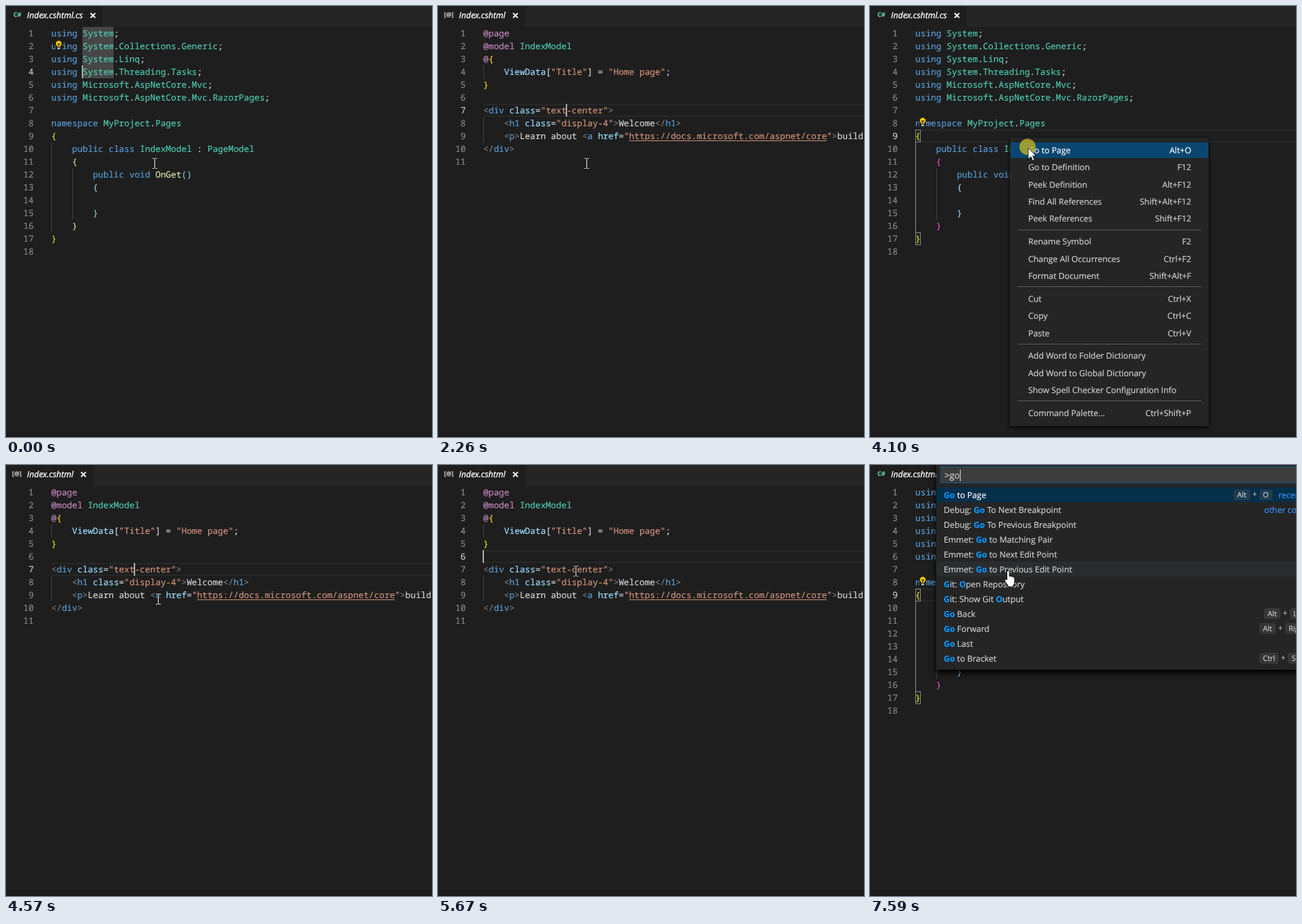
These frames come from a looping animation (630 by 638 pixels, 8 s). An HTML page:

```html
<!DOCTYPE html>
<html lang="en">
<head>
<meta charset="utf-8">
<title>Editor: switching between page and model</title>
<style>
html, body { margin: 0; width: 100%; height: 100%; overflow: hidden; background: #1e1e1e; }
#stage { position: relative; width: 630px; height: 638px; overflow: hidden; background: #1e1e1e;
  font: 12.35px "Open Sans", sans-serif; color: #d0d0d0; text-rendering: geometricPrecision; white-space: pre;
  -webkit-text-stroke: .2px; }
#stage div { position: absolute; box-sizing: border-box; }
#stage svg { position: absolute; left: 0; top: 0; overflow: visible; }
.timed:not(.on) { visibility: hidden; }
.full { inset: 0; }
.bar { left: 0; top: 0; width: 630px; height: 31px; background: #252526; }
.tab { left: 0; top: 0; height: 31px; background: #1e1e1e; color: #fff; line-height: 28px; }
.name { left: 31px; font-style: italic; font-size: 12.4px; -webkit-text-stroke: .35px; }
.icon { top: -1px; font-size: 9px; font-weight: 700; }
.code, .num, .now { font: 12.83px/19px "Noto Sans Mono", monospace; height: 19px; }
.code { left: 67px; }
.num, .now { left: 0; width: 41px; text-align: right; color: #858585; }
.now { color: #c6c6c6; background: #1e1e1e; }
.line { left: 67px; width: 570px; height: 19px; border: 2px solid #282828; border-left: 0; }
.guide { width: 1px; background: #404040; }
.lit { background: #8f8f78; }
.word { left: 113px; width: 46px; height: 19px; background: #474747; }
.caret { width: 2px; height: 19px; background: #aeafad; }
.pair { left: 67px; width: 8px; height: 19px; border: 1px solid #888; background: #0064001a; }
.foot { left: 0; top: 636px; width: 630px; height: 2px; background: #191919; }
.k { color: #569cd6; } .t { color: #4ec9b0; } .w { color: #d4d4d4; } .f { color: #dcdcaa; }
.s, .u { color: #ce9178; } .a { color: #9cdcfe; } .g { color: #808080; } .p { color: #c586c0; }
.u { text-decoration: underline 1px; text-underline-offset: 2px; }
.b0, .r { color: #f5d916; } .b1 { color: #da4fc4; } .b2 { color: #87cefa; }
.soft .b0 { color: #e0cf55; } .soft .b1 { color: #d9cf98; } .soft .b2 { color: #7cc6cc; }
.raw [class^=b] { color: #d4d4d4; } .raw .r { color: #c586c0; } .raw .u { text-decoration: none; }
.menu { background: #252526; box-shadow: 0 2px 5px #000; }
.item { left: 1px; right: 1px; height: 23px; line-height: 23px; padding-left: 26px; }
.item div { right: 25px; top: 0; }
.item.hot { background: #094771; color: #fff; }
.sep { left: 11px; right: 11px; height: 1px; background: #5a5a5a; }
.palette { left: 98px; top: -10px; width: 540px; height: 313px; background: #252526; box-shadow: 0 5px 8px #000; }
.input { left: 104px; top: 2px; width: 540px; height: 25px; background: #3c3c3c; border: 1px solid #0e5c92;
  padding-left: 5px; font-size: 13.2px; line-height: 23px; }
.type { display: inline-block; height: 17px; line-height: 17px; vertical-align: middle; border-right: 1px solid transparent; }
.type.on { border-color: #ddd; }
.row { left: 98px; width: 540px; height: 22px; line-height: 23px; padding-left: 11px; }
.row b { color: #0097fb; }
.row.sel { background: #062f4a; color: #fff; }
.row.over { background: #2a2d2e; }
.keys { top: 3px; display: flex; height: 16px; line-height: 15px; font-size: 11px; gap: 4px; color: #ccc; }
.keys kbd { font: inherit; padding: 0 4px; border: 1px solid #3a3a3a; border-radius: 3px; background: #80808030; }
.tag { top: 0; color: #3794ff; }
</style>
</head>
<body>
<div id="stage"></div>
<script>
const LOOP = 8000, LINE = 19, TOP = 31;
const stage = document.getElementById('stage');
const timed = [];
const lineTop = n => TOP + LINE * (n - 1);

function add(parent, cls, html = '', pos = {}) {
  const el = document.createElement('div');
  el.className = cls;
  el.innerHTML = html;
  for (const k in pos) el.style[k] = pos[k] + 'px';
  parent.append(el);
  return el;
}
// ranges: start, end, start, end, ...
const when = (el, cls, ranges) => (timed.push({ el, cls, ranges }), el);
const show = (el, ...ranges) => (el.classList.add('timed'), when(el, 'on', ranges));
const within = (t, r) => r.some((a, i) => i % 2 === 0 && t >= a && t < r[i + 1]);

const esc = s => s.replace(/&/g, '&amp;').replace(/</g, '&lt;');
const span = (cls, s) => `<span class="${cls}">${esc(s)}</span>`;
const marked = s => s.split('~').map(p => span(p[0], p.slice(2))).join('');

let depth = 0;
function csharp(s) {
  return s.replace(/\w+|[{}()]|[^\w{}()]+/g, w => {
    if (/^(using|namespace|public|class|void)$/.test(w)) return span('k', w);
    if (w === 'OnGet') return span('f', w);
    if (/^\w/.test(w)) return span('t', w);
    if (/[{(]/.test(w)) return span('b' + depth++, w);
    if (/[})]/.test(w)) return span('b' + --depth, w);
    return span('w', w);
  });
}

function editor(title, width, icon, lines, paint) {
  const view = add(stage, 'full');
  add(view, 'bar');
  const tab = add(view, 'tab', icon, { width });
  add(tab, 'name', title);
  tab.insertAdjacentHTML('beforeend',
    `<svg><path d="M${width - 18} 10.5l7 7m0-7l-7 7" stroke="#fff" stroke-width="1.8"/></svg>`);
  const back = add(view, 'full');
  lines.forEach((s, i) => {
    add(view, 'num', i + 1, { top: lineTop(i + 1) });
    add(view, 'code', paint(s), { top: lineTop(i + 1) });
  });
  return { view, back };
}
const guide = (ed, x, from, to, cls = '') =>
  add(ed.back, 'guide ' + cls, '', { left: x, top: lineTop(from), height: LINE * (to - from + 1) });
const caret = (ed, x, n, ...r) => show(add(ed.view, 'caret', '', { left: x - 1, top: lineTop(n) }), ...r);
const activeNum = (ed, n, ...r) => show(add(ed.view, 'now', n, { top: lineTop(n) }), ...r);
const activeLine = (ed, n, ...r) => {
  show(add(ed.back, 'line', '', { top: lineTop(n) }), ...r);
  activeNum(ed, n, ...r);
};
const bulb = (n, ...r) => show(add(cs.view, 'bulb', `<svg><g transform="translate(78 ${lineTop(n) + 7})">
  <path d="M-5-6h10v14h-10z" fill="#1e1e1e"/>
  <path d="M-2 3.6C-2 2-4.2 1.4-4.2-1.4a4.2 4.2 0 0 1 8.4 0C4.2 1.4 2 2 2 3.6z" fill="#fc0"/>
  <path d="M-1.8-1.5L0 .2 1.8-1.5M0 .2V3.5" fill="none" stroke="#1e1e1e" stroke-width="1.2"/>
  <path d="M-2 4.5h4v2.5h-4z" fill="#b5b5b5"/></g></svg>`), ...r);

const cs = editor('Index.cshtml.cs', 143,
  '<div class="icon" style="left:11px;color:#6cc79c">C#</div>',
  ['using System;', 'using System.Collections.Generic;', 'using System.Linq;',
    'using System.Threading.Tasks;', 'using Microsoft.AspNetCore.Mvc;',
    'using Microsoft.AspNetCore.Mvc.RazorPages;', '', 'namespace MyProject.Pages', '{',
    '    public class IndexModel : PageModel', '    {', '        public void OnGet()',
    '        {', '', '        }', '    }', '}', ''], csharp);
show(cs.view, 0, 1000, 1630, 2090, 2640, 4330, 5810, LOOP);
when(cs.view, 'raw', [1630, 1710, 2640, 2720, 5810, 5980]);
when(cs.view, 'soft', [0, 3420]);
guide(cs, 67, 10, 16);
guide(cs, 98, 12, 15);
show(guide(cs, 67, 10, 16, 'lit'), 3500, 4330, 6050, LOOP);
for (let n = 1; n <= 4; n++)
  show(add(cs.back, 'word', '', { top: lineTop(n) }), 0, 1000, 1860, 2090, 2870, 3420);
activeNum(cs, 4, 0, 3420);
activeLine(cs, 9, 3420, LOOP);
for (const n of [9, 17])
  show(add(cs.back, 'pair', '', { top: lineTop(n) }), 3500, 4330, 6050, LOOP);
caret(cs, 113, 4, 0, 470, 1630, 2090, 2640, 3100);
caret(cs, 75, 9, 3420, 3570, 5810, 6300);
bulb(2, 0, 230);
bulb(3, 230, 1000, 1860, 2090, 2870, 3870);
bulb(8, 3950, 4330, 6050, LOOP);

const page = editor('Index.cshtml', 129,
  '<div class="icon" style="left:9px;color:#c4c4c4">[@]</div>',
  ['p|@page', 'p|@model ~t|IndexModel', 'p|@~r|{',
    'w|    ~a|ViewData~w|[~s|"Title"~w|] = ~s|"Home page"~w|;', 'r|}', 'w|',
    'g|<~k|div ~a|class~w|=~s|"text-center"~g|>',
    'w|    ~g|<~k|h1 ~a|class~w|=~s|"display-4"~g|>~w|Welcome~g|</~k|h1~g|>',
    'w|    ~g|<~k|p~g|>~w|Learn about ~g|<~k|a ~a|href~w|=~s|"~u|https://docs.microsoft.com/aspnet/core~s|"~g|>~w|building Web apps with ASP.NET Core',
    'g|</~k|div~g|>', 'w|'], marked);
show(page.view, 1000, 1630, 2090, 2640, 4330, 5810);
when(page.view, 'raw', [1000, 1090, 2090, 2260, 4330, 4490]);
guide(page, 67, 4, 4);
guide(page, 67, 8, 9);
activeLine(page, 7, 1000, 4880);
activeLine(page, 6, 4880, 5810);
caret(page, 190, 7, 1000, 1490, 2090, 2640, 4330, 4830);
caret(page, 67, 6, 4880, 5120, 5590, 5810);

add(stage, 'foot');

// Context menus: groups of "label|shortcut"
function menu(left, top, width, height, groups, hover, open) {
  const box = show(add(stage, 'menu', '', { left, top, width, height }), ...open);
  let y = 19, first = true;
  groups.forEach((group, g) => {
    if (g) {
      add(box, 'sep', '', { top: Math.round(y - 10.2) });
      y += 8.5;
    }
    for (const entry of group) {
      const [label, key = ''] = entry.split('|');
      const item = add(box, 'item', `${label}<div>${key}</div>`, { top: Math.round(y - 12) });
      if (first) when(item, 'hot', hover);
      first = false;
      y += 25.35;
    }
  });
}
const edits = ['Cut|Ctrl+X', 'Copy|Ctrl+C', 'Paste|Ctrl+V'];
const words = ['Add Word to Folder Dictionary', 'Add Word to Global Dictionary', 'Show Spell Checker Configuration Info'];
const command = ['Command Palette...|Ctrl+Shift+P'];
menu(207, 195, 294, 427, [
  ['Go to Page|Alt+O', 'Go to Definition|F12', 'Peek Definition|Alt+F12',
    'Find All References|Shift+Alt+F12', 'Peek References|Shift+F12'],
  ['Rename Symbol|F2', 'Change All Occurrences|Ctrl+F2', 'Format Document|Shift+Alt+F'],
  edits, words, command], [3870, 4250], [3570, 4250]);
menu(178, 143, 288, 274, [['Go to PageModel|Alt+O'], ['Change All Occurrences|Ctrl+F2'],
  edits, words, command], [5200, 5500], [5120, 5500]);

// Command palette
const palette = show(add(stage, 'full'), 6820, LOOP);
add(palette, 'palette');
const input = add(palette, 'input', '<span class="type"></span>').firstChild;
when(input, 'on', [6820, 7290, 7510, LOOP]);

function list(rows, ...r) {
  const box = show(add(palette, 'full'), ...r);
  rows.forEach((s, i) => {
    const [label, x, keys, tag, tagX] = s.split('|');
    const row = add(box, 'row', label.replace(/\*(\w+)\*/g, '<b>$1</b>'), { top: 33 + 22 * i });
    if (i === 0) row.classList.add('sel');
    if (i === 5) row.classList.add('over');
    if (keys) add(row, 'keys', keys.split('+').map(k => `<kbd>${k}</kbd>`).join('+'), { left: x - 98 });
    if (tag) add(row, 'tag', tag, { left: tagX - 98 });
  });
}
list(['Go to Page|538|Alt+O|recently used|604', 'Add Cursor Above|||other commands|583', 'Add Cursor Below',
  'Add Cursors to Line Ends', 'Add Line Comment', 'Add Selection to Next Find Match',
  'Add Selection to Previous Find Match', 'Change All Occurrences|583|Ctrl+F2', 'Change End of Line Sequence',
  'Change File Encoding', 'Change Language Mode', 'Close All Editors'], 6900, 7510);
list(['*Go* to Page|538|Alt+O|recently used|604', 'Debug: *Go* To Next Breakpoint|||other commands|583',
  'Debug: *Go* To Previous Breakpoint', 'Emmet: *Go* to Matching Pair', 'Emmet: *Go* to Next Edit Point',
  'Emmet: *Go* to Previous Edit Point', '*G*it: *O*pen Repository', '*G*it: Show Git *O*utput',
  '*Go* Back|583|Alt+LeftArrow', '*Go* Forward|576|Alt+RightArrow', '*Go* Last',
  '*Go* to Bracket|576|Ctrl+Shift+\\'], 7510, LOOP);

// Mouse pointer
const mouse = add(stage, 'mouse');
const shape = (svg, ...r) => show(add(mouse, 'shape', `<svg>${svg}</svg>`), ...r);
const beam = 'M-3.5-7.5H-.8M.8-7.5H3.5M0-7V7M-3.5 7.5H-.8M.8 7.5H3.5';
shape('<circle cx="-1" cy="-1.5" r="12" fill="#beb428" fill-opacity=".8"/>', 4100, 4250, 5350, 5500);
shape(`<path d="${beam}" stroke="#000" stroke-width="3"/><path d="${beam}" stroke="#fff" stroke-width="1.2"/>`,
  0, 3570, 4330, 5120, 5500, 6740);
shape('<path d="M0 0V16.5L4 13L6.6 19L9.2 18L6.6 12H11.5Z" fill="#fff" stroke="#000" stroke-width=".8"/>',
  3570, 4330, 5120, 5500);
shape(`<path d="M-1.5 13V1.3a1.8 1.8 0 0 1 3.6 0V8q1.6-1.6 3 .3 1.6-1 2.6.8 2.2-.6 2.2 1.9V16q0 3-2 5.5V23H0V21.5L-4.6 14.5q-.8-2.6 1.4-2.4z"
  fill="#fff" stroke="#000" stroke-width=".9"/>`, 6740, LOOP);

// Each move: start, end, then the place reached
const moves = [[-1, 0, 220, 233], [3260, 3500, 207, 195], [3790, 4100, 234, 210], [4490, 4960, 182, 142], [5120, 5350, 204, 157]];
function mouseAt(t) {
  let [x, y] = moves[0].slice(2);
  for (const [a, b, tx, ty] of moves) {
    if (t < a) break;
    const steps = Math.round((b - a) / 78);
    const p = t >= b ? 1 : Math.floor((t - a) / (b - a) * steps) / steps;
    x += (tx - x) * p;
    y += (ty - y) * p;
  }
  return [x, y];
}

const start = performance.now();
function frame() {
  const t = (performance.now() - start) % LOOP;
  for (const { el, cls, ranges } of timed) el.classList.toggle(cls, within(t, ranges));
  input.textContent = t < 7510 ? '>' : t < 7590 ? '>g' : '>go';
  const [x, y] = mouseAt(t);
  mouse.style.transform = `translate(${x}px, ${y}px)`;
  requestAnimationFrame(frame);
}
frame();
</script>
</body>
</html>
```
